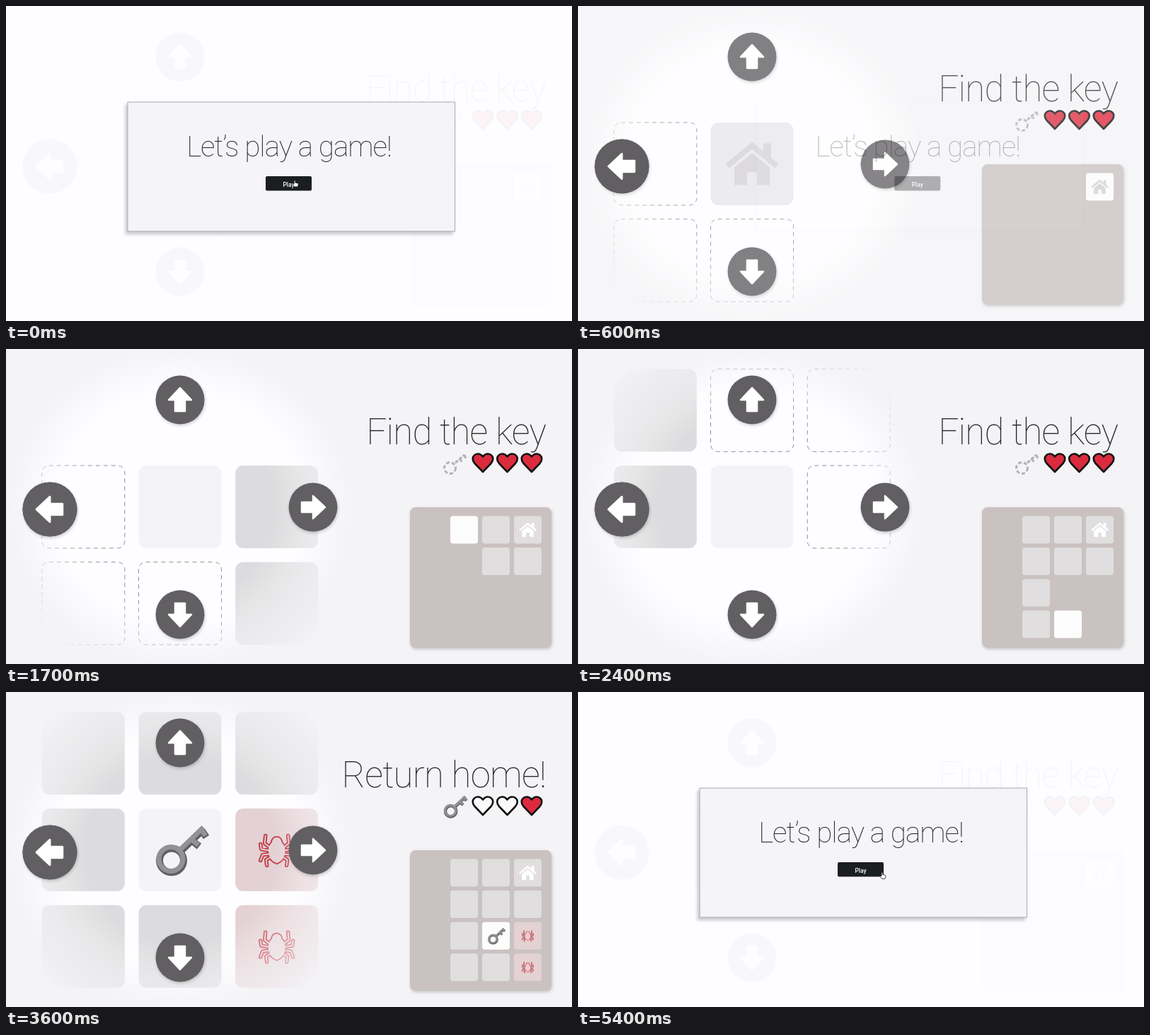
An HTML page for the animation above (5.5 s loop, 800x446 px).

```html
<!DOCTYPE html>
<html lang="en">
<head>
<meta charset="utf-8">
<title>Find the key</title>
<style>
  html, body { margin: 0; width: 100%; height: 100%; overflow: hidden; background: #f4f3f6; }
  svg { display: block; width: 800px; height: 446px; }
  text { font-family: Roboto, Inter, sans-serif; fill: #29282b; }
  .head { font-size: 51px; font-weight: 200; letter-spacing: -.015em; text-anchor: end; }
  .title { font-size: 40.5px; font-weight: 200; letter-spacing: -.025em; text-anchor: middle; }
  .label { font-size: 8.3px; font-weight: 500; text-anchor: middle; fill: #fff; }
  #states { isolation: isolate; }
  .state { mix-blend-mode: plus-lighter; }
  .soft { filter: drop-shadow(1px 2px 2px #0003); }
</style>
</head>
<body>
<svg viewBox="0 0 800 446">
  <defs>
    <radialGradient id="glow">
      <stop offset=".72" stop-color="#fefdff"/>
      <stop offset="1" stop-color="#fefdff" stop-opacity="0"/>
    </radialGradient>
    <radialGradient id="fade" gradientUnits="userSpaceOnUse" cx="246" cy="224" r="265">
      <stop offset=".5" stop-color="#fff"/>
      <stop offset="1" stop-color="#000"/>
    </radialGradient>
    <mask id="spot" maskUnits="userSpaceOnUse" x="0" y="0" width="800" height="446">
      <rect width="800" height="446" fill="url(#fade)"/>
    </mask>
    <g id="house">
      <path d="M-35 3L0-26L35 3" fill="none" stroke="currentColor" stroke-width="8" stroke-linejoin="round"/>
      <path d="M16-29H27V-4L16-13ZM-25 5L0-15L25 5V30H7V12H-7V30H-25Z" fill="currentColor"/>
    </g>
    <g id="keyShape" fill="none">
      <circle cx="-13" cy="13" r="17"/>
      <path d="M0 0L33-32M30-29L36-20M16-15L26-7"/>
    </g>
    <g id="key">
      <use href="#keyShape" stroke="#606063" stroke-width="10" x="1" y="2"/>
      <use href="#keyShape" stroke="#929295" stroke-width="7"/>
    </g>
    <g id="spiderShape" stroke-linecap="round" stroke-linejoin="round">
      <path fill="none" d="M-9-3L-17-9L-16-20M-10 1L-22-1L-23-8M-10 6L-20 7L-23 15M-8 10L-15 14L-14 22
        M9-3L17-9L16-20M10 1L22-1L23-8M10 6L20 7L23 15M8 10L15 14L14 22"/>
      <path d="M-6-10C-6-19 6-19 6-10C15-2 11 14 0 18C-11 14-15-2-6-10Z"/>
    </g>
    <path id="heart" d="M0 13L-11.5 1C-20-9-7-18 0-8.5C7-18 20-9 11.5 1Z" stroke="#111" stroke-width="2.6" stroke-linejoin="round"/>
    <g id="arrow">
      <circle r="34.5" fill="#615f62"/>
      <path d="M0-17L16 0H7V16H-7V0H-16Z" fill="#fff" stroke="#fff" stroke-width="2.5" stroke-linejoin="round"/>
    </g>
  </defs>

  <rect width="800" height="446" fill="#f4f3f6"/>
  <ellipse cx="246" cy="224" rx="242" ry="226" fill="url(#glow)"/>
  <rect class="soft" x="571" y="224" width="200" height="199" rx="8" fill="#c9c2c1"/>
  <g id="states"></g>
  <g class="soft">
    <use href="#arrow" transform="translate(246 72)"/>
    <use href="#arrow" transform="translate(434 224) rotate(90)"/>
    <use href="#arrow" transform="translate(246 376) rotate(180)"/>
    <use href="#arrow" transform="translate(62 227) rotate(-90) scale(1.115)"/>
  </g>
  <rect id="veil" width="800" height="446" fill="#fefdff"/>
  <g id="hover"><use href="#arrow" transform="translate(62 227) rotate(-90) scale(1.115)"/></g>

  <g id="dialog">
    <rect id="panel" x="172" y="136" width="462.5" height="183" fill="#f5f4f9" stroke="#a9a8ac"
      style="filter:drop-shadow(-3px 4px 2px #0003)"/>
    <rect x="367" y="241" width="65" height="20.5" rx="2" fill="#1b1e1f"/>
    <g id="start">
      <text class="title" x="400" y="213">Let’s play a game!</text>
      <text class="label" x="399.5" y="255.5">Play</text>
    </g>
    <g id="won">
      <text class="title" x="400" y="213">Well done!</text>
      <text class="label" x="399.5" y="255">Replay!</text>
    </g>
  </g>
  <path id="cursor" d="M-2-4.5Q-1-5.5 0-4.5V-1.5L4-.5Q5 0 4.5 2L3.5 5H-1.5L-4.5 1Q-4-.5-2 1Z"
    fill="#fff" stroke="#222" stroke-width=".9" stroke-linejoin="round"/>
</svg>

<script>
const LOOP = 5500, PITCH = 136.7, FADE = 120;
const $ = id => document.getElementById(id);
const clamp = v => Math.max(0, Math.min(1, v));
const ramp = (t, a, b) => clamp((t - a) / (b - a));
const mix = (a, b, p) => a + (b - a) * p;
const show = (el, alpha) => {
  el.style.opacity = alpha;
  el.style.display = alpha > 0 ? '' : 'none';
};

// Each step: column, row, time of arrival
const steps = [
  [3, 0, -FADE], [3, 1, 850], [2, 1, 1050], [2, 0, 1250], [1, 0, 1450],
  [1, 1, 1750], [1, 2, 1880], [1, 3, 2010], [2, 3, 2140],
  [3, 3, 2420], [3, 2, 2750], [2, 2, 3150]
];
const things = { '3,0': 'house', '3,3': 'spider', '3,2': 'spider', '2,2': 'key' };

function spider(fill) {
  return `<use href="#spiderShape" fill="${fill}" stroke="#c23b45" stroke-width="5.5"/>
    <use href="#spiderShape" fill="${fill}" stroke="${fill}" stroke-width="1.8"/>`;
}

function tile(x, y, scale, thing, current) {
  const mini = scale < 1;
  let fill = mini ? '#e0dedf' : '#dcdbdd';
  if (current) fill = mini ? '#fdfcfd' : thing === 'house' ? '#e8e7ea' : '#f4f4f6';
  if (thing === 'spider') fill = '#e3d1d4';
  const icon = thing === 'spider' ? spider(fill)
    : thing ? `<use href="#${thing}" color="${current ? '#d3d1d4' : '#fff'}"/>` : '';
  return `<g transform="translate(${x} ${y}) scale(${scale})">
    <rect x="-58.5" y="-58.5" width="117" height="117" rx="11" fill="${fill}"/>${icon}</g>`;
}

const dashedTile = (x, y) => `<rect x="${x - 58.5}" y="${y - 58.5}" width="117" height="117" rx="10"
  fill="none" stroke="#858387" stroke-width=".9" stroke-dasharray="6 5"/>`;

const emptyKey = `<g transform="translate(634 162)" fill="none" stroke="#b3b1b4" stroke-width="3">
  <circle cx="-6.5" cy="6.5" r="8" stroke-dasharray="5 3"/>
  <path d="M1-1L14-12M14-12L16-7M7-6L11-2" stroke-dasharray="5 2"/></g>`;

function state(n) {
  const [col, row] = steps[n];
  const path = steps.slice(0, n + 1).map(s => s[0] + ',' + s[1]);
  const found = path.includes('2,2');
  const lost = path.filter(p => things[p] === 'spider').length;
  let board = '', map = '', hearts = '';
  for (let r = 0; r < 4; r++) for (let c = 0; c < 4; c++) {
    const id = c + ',' + r, seen = path.includes(id);
    const dx = c - col, dy = r - row, here = !dx && !dy;
    if (seen) map += tile(602.5 + c * 45, 256 + r * 44.6, 1 / 3, things[id], here);
    if (Math.abs(dx) > 1 || Math.abs(dy) > 1) continue;
    const x = 246 + dx * PITCH, y = 223.5 + dy * PITCH;
    board += seen ? tile(x, y, 1, things[id], here) : dashedTile(x, y);
  }
  for (let i = 0; i < 3; i++)
    hearts += `<use href="#heart" x="${674 + i * 34.5}" y="161" fill="${i < lost ? '#fafafc' : '#dc2b3e'}"/>`;
  const key = found ? '<use href="#key" transform="translate(634 162) scale(.45)"/>' : emptyKey;
  return `<g class="state"><g mask="url(#spot)">${board}</g>${map}${hearts}${key}
    <text class="head" x="763" y="135">${found ? 'Return home!' : 'Find the key'}</text></g>`;
}

$('states').innerHTML = steps.map((_, n) => state(n)).join('');
const views = [...$('states').children];

function draw(t) {
  // After the replay the board is back at its first step
  const game = t < 5100 ? t : 0;
  const arrive = n => n < steps.length ? ramp(game, steps[n][2], steps[n][2] + FADE) : 0;
  views.forEach((view, n) => show(view, arrive(n) - arrive(n + 1)));

  const leave = ramp(t, 280, 760), back = ramp(t, 3640, 3960);
  const shown = t < 2000 ? 1 - leave : back;
  show($('veil'), .96 * (1 - ramp(t, 280, 690) + back));
  show($('hover'), ramp(t, 400, 600) * (1 - ramp(t, 3640, 3860)));
  show($('dialog'), shown);
  show($('panel'), shown ** 2);
  $('dialog').setAttribute('transform', `translate(${t < 2000 ? 120 * leave : -120 * (1 - back) ** 2} 0)`);

  const swap = t < 2000 ? 1 : ramp(t, 5080, 5280);
  show($('start'), swap);
  show($('won'), 1 - swap);

  const come = 1 - (1 - ramp(t, 4450, 5000)) ** 2;
  const press = t < 2000 ? 1 : ramp(t, 5400, 5500);
  const x = mix(mix(785, 431, come), 409, press);
  const y = mix(mix(392, 260, come), 251.5, press);
  $('cursor').setAttribute('transform', `translate(${x} ${y}) scale(.9)`);
  show($('cursor'), t < 2000 ? 1 - ramp(t, 280, 400) : t > 4450 ? 1 : 0);
}

function frame() {
  draw(performance.now() % LOOP);
  requestAnimationFrame(frame);
}
frame();
</script>
</body>
</html>
```
